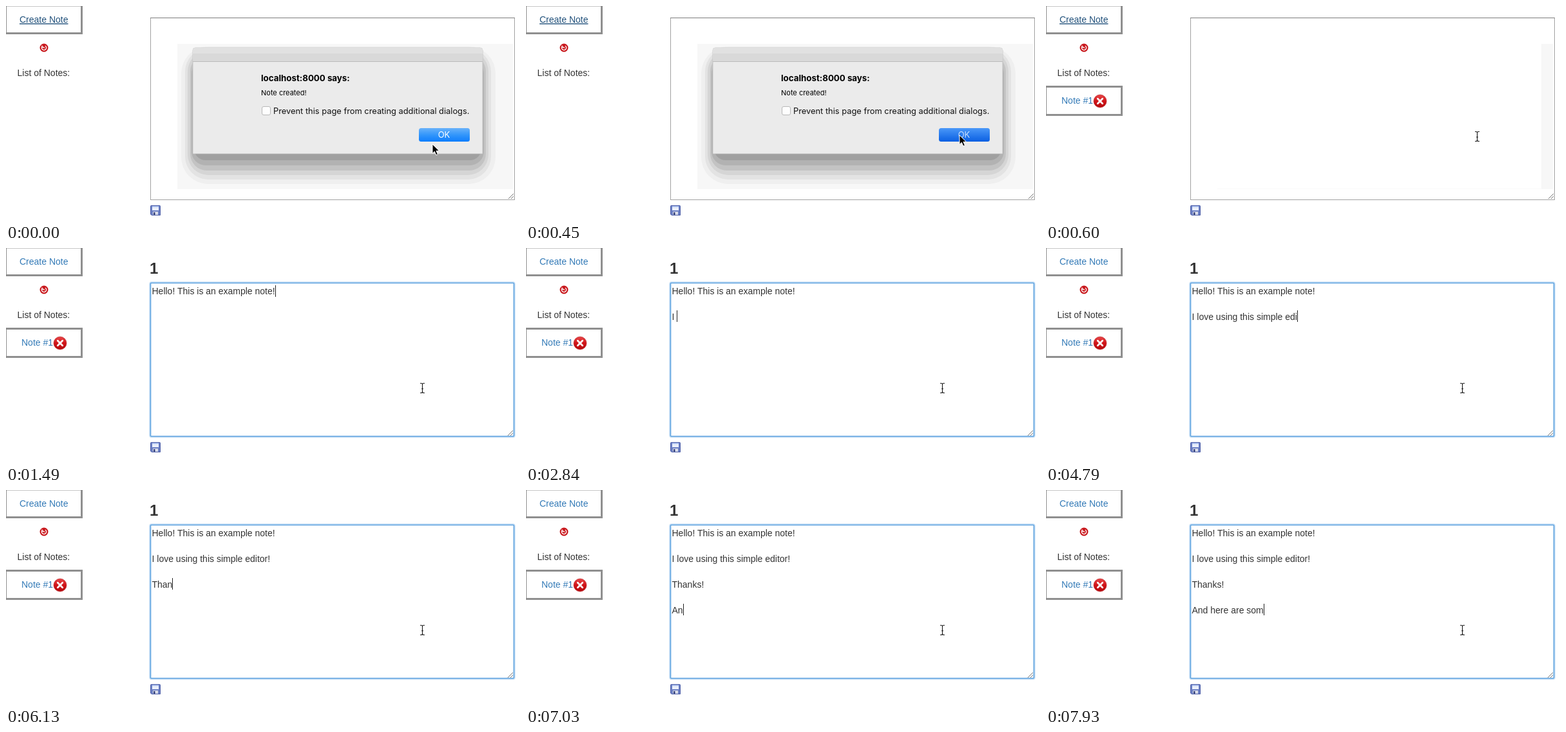
Animation, 798 px wide and 333 px high, one loop 8000 ms. Source, as an HTML page:

```html
<!DOCTYPE html>
<html lang="en">
<head>
<meta charset="utf-8">
<title>Notes</title>
<style>
  html, body { margin: 0; width: 100%; height: 100%; overflow: hidden; background: #fff; }
  svg { display: block; width: 798px; height: 333px; }
  text { white-space: pre; font: 14px "Liberation Sans", Arial, sans-serif; fill: #333; }
  .link { fill: #337ab7; }
  .hover { fill: #23527c; text-decoration: underline; }
  #dialog text { font: 12.85px Inter, "Open Sans", sans-serif; fill: #111; }
  #dialog .head { font-size: 13.3px; font-weight: 700; fill: #000; }
  #dialog .msg { font-size: 11px; fill: #000; }
  #dialog .ok { font-size: 13px; fill: #fff; text-anchor: middle; }
  #heading { font-size: 24px; font-weight: 700; }
  .frame { fill: #fff; stroke: #8f8f8f; stroke-width: 3; }
</style>
</head>
<body>
<svg viewBox="0 0 798 333">
  <defs>
    <linearGradient id="blue" x2="0" y2="1">
      <stop offset="0" stop-color="#69b2fa"/><stop offset=".5" stop-color="#3396fb"/><stop offset="1" stop-color="#0d7dfd"/>
    </linearGradient>
    <linearGradient id="pressed" x2="0" y2="1">
      <stop offset="0" stop-color="#4a98f8"/><stop offset="1" stop-color="#0a5fe2"/>
    </linearGradient>
    <linearGradient id="red" x2="0" y2="1">
      <stop offset="0" stop-color="#e8494b"/><stop offset=".5" stop-color="#d01418"/><stop offset="1" stop-color="#b40b10"/>
    </linearGradient>
    <path id="grip" d="M-8 0L0-8M-4 0L0-4" fill="none" stroke="#777"/>
  </defs>
  <rect width="798" height="333" fill="#fff"/>

  <!-- sidebar -->
  <rect class="frame" x="-.5" y="-1" width="118" height="43.5"/>
  <text id="create" x="21" y="26">Create Note</text>
  <circle cx="59" cy="65" r="6.5" fill="#c9181d"/>
  <path d="M56.3 62.6A3.6 3.6 0 1 0 61 62M56 61.5v2.7h2.8" fill="none" stroke="#fff" stroke-width="1.4"/>
  <circle cx="59.2" cy="65" r="1" fill="#f3c9c9"/>
  <text x="17.5" y="109">List of Notes:</text>
  <g id="note">
    <rect class="frame" x="-.5" y="125.5" width="118" height="44"/>
    <text id="noteLink" class="link" x="24" y="152">Note #1</text>
    <circle cx="84" cy="148" r="10" fill="url(#red)" stroke="#b5171b" stroke-width=".6"/>
    <path d="M80.3 144.3l7.4 7.4m0-7.4l-7.4 7.4" stroke="#fff" stroke-width="2.8" stroke-linecap="round"/>
  </g>

  <!-- empty area -->
  <g id="blank">
    <rect x="224.5" y="18.5" width="565" height="283" fill="#fff" stroke="#a2a2a2"/>
    <path d="M224 18.5H790" stroke="#7d7d7d"/>
    <use href="#grip" x="788" y="300"/>
    <rect x="769" y="59" width="18" height="226" fill="#f7f7f7"/>
    <path d="M266 284.5H770" stroke="#f9f9f9"/>
  </g>

  <!-- focused editor -->
  <g id="editor">
    <text id="heading" x="223" y="40">1</text>
    <rect x="224" y="54" width="565" height="239.5" rx="2" fill="none" stroke="#c5def5" stroke-width="3.6"/>
    <rect x="224.5" y="54.5" width="564" height="238.5" rx="1" fill="#fff" stroke="#5fa3df" stroke-width="1.6"/>
    <use href="#grip" x="787" y="292"/>
    <g id="lines"></g>
    <rect id="caret" width="1" height="18" fill="#222"/>
  </g>

  <g id="save">
    <path d="M.5 1.5q0-1 1-1H14.5q1 0 1 1V15.5H2L.5 14Z" fill="#6b7fc4" stroke="#4c5da6"/>
    <path d="M3 1H13V8H3Z" fill="#e9effb"/>
    <path d="M3 1H13V3H3Z" fill="#a9bdec"/>
    <path d="M4 10H12V15H4Z" fill="#d9dce8"/>
    <path d="M5 11H7.5V15H5Z" fill="#35427c"/>
  </g>

  <g id="dialog">
    <rect x="266" y="59" width="521" height="226" fill="#f7f7f7"/>
    <g id="shadow"></g>
    <path d="M290 230V69q0-4 4-4H736q4 0 4 4V230Z" fill="#ebebeb" stroke="#bdbdbd" stroke-width=".8"/>
    <path d="M290 86V69q0-4 4-4H736q4 0 4 4V86Z" fill="#d9d9d9"/>
    <path d="M290 74V69q0-4 4-4H736q4 0 4 4V74Z" fill="#e1e1e1"/>
    <path d="M290 86.5H740" stroke="#bcbcbc"/>
    <text class="head" x="396" y="117">localhost:8000 says:</text>
    <text class="msg" x="396" y="139">Note created!</text>
    <rect x="397.5" y="156.5" width="13" height="13" rx="2.5" fill="#fdfdfd" stroke="#b8b8b8"/>
    <text x="415" y="168">Prevent this page from creating additional dialogs.</text>
    <rect id="okButton" x="641" y="190" width="79" height="21" rx="3.5"/>
    <text id="okText" class="ok" x="680" y="205">OK</text>
  </g>

  <path id="arrow" d="M0 0V14.5L3.4 11.3L5.8 17L8.4 15.9L6 10.4H10.6Z" fill="#000" stroke="#fff"/>
  <path id="beam" d="M-3.5-7.5H-2Q0-7.5 0-5.5V5.5Q0 7.5-2 7.5H-3.5M3.5-7.5H2Q0-7.5 0-5.5M0 5.5Q0 7.5 2 7.5H3.5M-1.5 1H1.5" fill="none" stroke="#222" stroke-width="1.2"/>
</svg>
<script>
const LOOP = 8000;
const NOTE = "Hello! This is an example note!\n\nI love using this simple editor!\n\nThanks!\n\nAnd here are som";
const $ = id => document.getElementById(id);
const show = (id, on) => $(id).setAttribute("visibility", on ? "visible" : "hidden");
const move = (id, x, y) => $(id).setAttribute("transform", `translate(${x} ${y})`);

function add(parent, tag, attrs) {
  const el = document.createElementNS("http://www.w3.org/2000/svg", tag);
  for (const key in attrs) el.setAttribute(key, attrs[key]);
  return $(parent).appendChild(el);
}

// left, top, right, bottom, radius, grey
[[272, 63, 760, 277, 42, "#efefef"], [278, 66, 753, 270, 36, "#e3e3e3"],
 [282, 70, 749, 263, 32, "#d5d5d5"], [286, 76, 745, 256, 26, "#c3c3c3"],
 [288, 84, 742, 248, 22, "#b2b2b2"], [292, 92, 738, 240, 18, "#a0a0a0"]
].forEach(([x, y, r, b, rx, fill]) =>
  add("shadow", "rect", { x, y, width: r - x, height: b - y, rx, fill }));

const rows = NOTE.split("\n").map((_, i) => add("lines", "text", { x: 226.5, y: 72 + 20 * i }));

// start time, typed characters, and optionally where a steady run of typing ends
const TYPING = [
  [1490, 31], [1940, 32], [2240, 33], [2690, 34, 5090, 65], [5380, 66], [5680, 67],
  [5830, 68, 6430, 74], [6730, 75], [6880, 76], [7030, 78, 7930, 92]
];

// time, x, y
const POINTER = [
  [0, 662, 215], [150, 666, 210], [300, 673, 201], [600, 669, 203], [740, 600, 196],
  [890, 380, 177], [1040, 160, 156], [1190, 50, 150], [1490, 646, 218]
];

const latest = (list, t) => list.filter(item => item[0] <= t).pop();

function typedCount(t) {
  const [start, from, end, to] = latest(TYPING, t);
  if (!end) return from;
  const steps = (end - start) / 150;
  const step = Math.min(steps, Math.floor((t - start) / 150));
  return Math.floor(from + step * (to - from) / steps);
}

function drawNote(t) {
  const typed = NOTE.slice(0, typedCount(t)).split("\n");
  rows.forEach((row, i) => {
    const value = typed[i] || "";
    if (row.textContent !== value) row.textContent = value;
  });
  const last = typed.length - 1;
  const width = typed[last] ? rows[last].getComputedTextLength() : 0;
  $("caret").setAttribute("x", Math.round(226.4 + width));
  $("caret").setAttribute("y", 58 + 20 * last - (last ? 1 : 0));
}

function render(t) {
  const editing = t >= 1490, dialog = t < 600, pressed = t >= 450;
  show("dialog", dialog);
  show("note", !dialog);
  show("blank", !editing);
  show("editor", editing);
  move("save", 224, editing ? 302 : 310);
  $("create").setAttribute("class", t < 740 ? "hover" : "link");
  $("noteLink").setAttribute("class", t >= 1190 && !editing ? "hover" : "link");
  $("okButton").setAttribute("fill", pressed ? "url(#pressed)" : "url(#blue)");
  $("okText").setAttribute("opacity", pressed ? .75 : 1);

  const [, x, y] = latest(POINTER, t);
  const inText = !dialog && x > 224;
  show("beam", inText);
  show("arrow", !inText);
  move(inText ? "beam" : "arrow", x + (inText ? .5 : 0), y);
  if (editing) drawNote(t);
}

function tick() {
  render(performance.now() % LOOP);
  requestAnimationFrame(tick);
}
tick();
</script>
</body>
</html>
```
